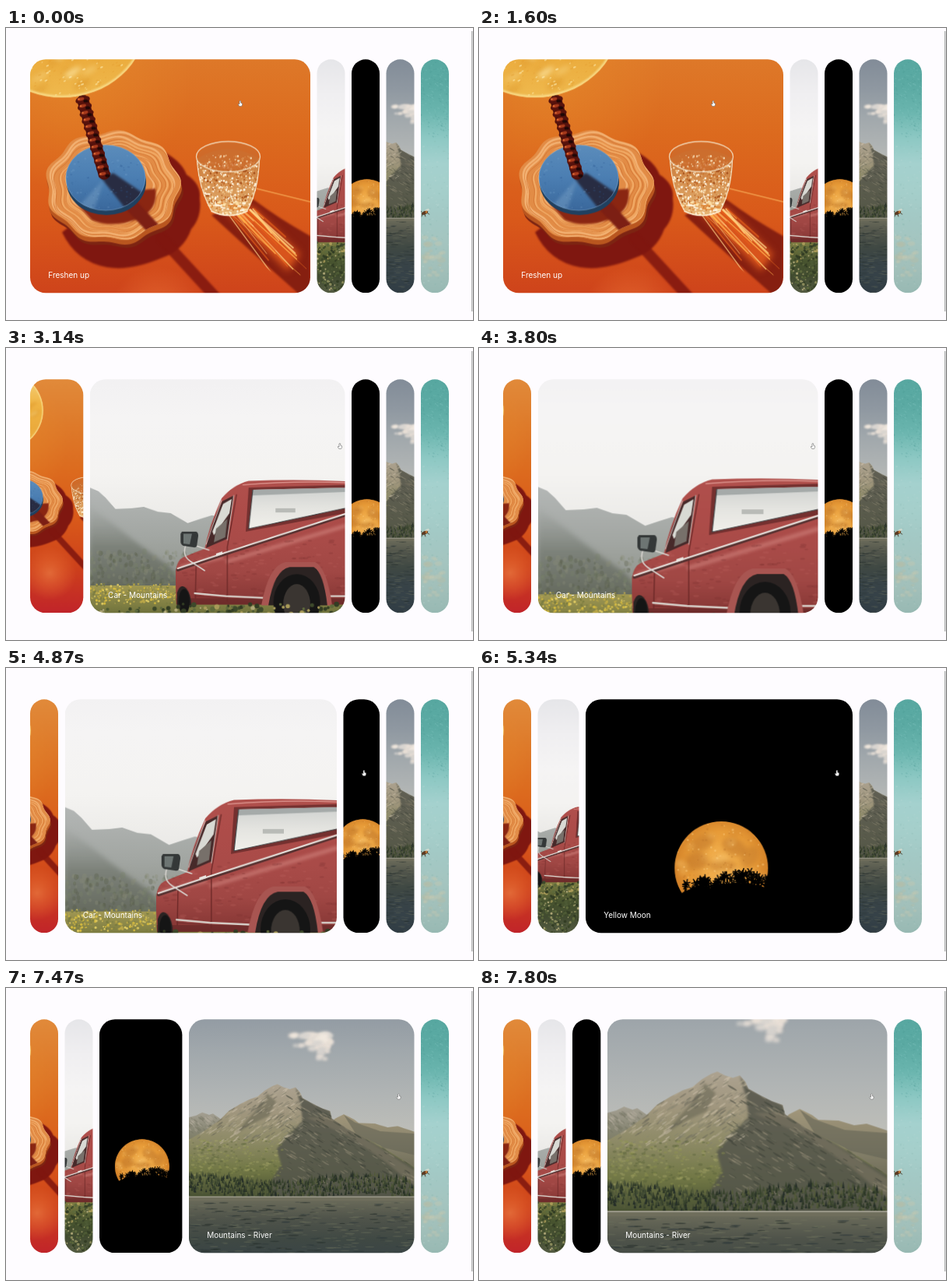
An HTML page with a canvas that plays this animation: 600x375 px, repeating every 8000 ms.

```html
<!DOCTYPE html>
<html lang="en">
<head>
<meta charset="utf-8">
<title>Expanding gallery</title>
<style>
html, body { margin: 0; width: 100%; height: 100%; overflow: hidden; background: #fefcff; }
canvas { display: block; width: 600px; height: 375px; }
</style>
</head>
<body>
<canvas id="stage" width="600" height="375"></canvas>
<script>
const ctx = document.getElementById('stage').getContext('2d');
let g; // context being painted on
let seed = 7;
const rnd = () => {
  seed = (seed + 0x6D2B79F5) | 0;
  let t = Math.imul(seed ^ (seed >>> 15), 1 | seed);
  t = (t + Math.imul(t ^ (t >>> 7), 61 | t)) ^ t;
  return ((t ^ (t >>> 14)) >>> 0) / 4294967296;
};
const pick = list => list[Math.floor(rnd() * list.length)];
const path = d => typeof d === 'string' ? new Path2D(d) : d;

function fill(color, d) { g.fillStyle = color; g.fill(path(d)); }
function line(color, width, d) { g.strokeStyle = color; g.lineWidth = width; g.stroke(path(d)); }
function ellipse(x, y, rx, ry, turn = 0) {
  const p = new Path2D();
  p.ellipse(x, y, rx, ry, turn, 0, 7);
  return p;
}
function oval(color, ...shape) { fill(color, ellipse(...shape)); }
function box(color, x, y, w, h) { g.fillStyle = color; g.fillRect(x, y, w, h); }
function blend(f, colors) {
  colors.forEach((c, i) => f.addColorStop(i / (colors.length - 1), c));
  return f;
}
const fade = (y0, y1, ...colors) => blend(g.createLinearGradient(0, y0, 0, y1), colors);
const glow = (x, y, r, ...colors) => blend(g.createRadialGradient(x, y, 0, x, y, r), colors);
function within(d, paint) { g.save(); g.clip(path(d)); paint(); g.restore(); }
function soft(px, paint) { g.filter = `blur(${px}px)`; paint(); g.filter = 'none'; }
function specks(n, x, y, w, h, colors, rx, ry = rx, turn = 0) {
  while (n--) {
    const k = 0.5 + rnd();
    oval(pick(colors), x + rnd() * w, y + rnd() * h, rx * k, ry * k, turn);
  }
}

// Each photo is a 2:3 portrait, painted at the size it has in an open panel.
function photo(left, paint) {
  const c = document.createElement('canvas');
  c.width = 360;
  c.height = 540;
  g = c.getContext('2d');
  g.lineCap = g.lineJoin = 'round';
  g.translate(-left, 80);
  paint();
  return c;
}

function scallop(x, y, rx, ry) {
  const p = new Path2D();
  for (let a = 0; a < 6.28; a += 0.04) {
    const r = 1 + 0.036 * Math.cos(9 * a + 0.6);
    p.lineTo(x + rx * r * Math.cos(a), y + ry * r * Math.sin(a));
  }
  p.closePath();
  return p;
}

function drinks() {
  box(fade(-80, 460, '#e18a3a', '#de7a2a', '#dc6a1e', '#d9591a', '#cd411b', '#c1242a'), 31, -80, 360, 540);
  box(glow(90, 60, 150, '#e8902c88', '#e8902c00'), 31, -80, 240, 290);
  box(glow(195, 368, 62, '#f58f4e88', '#f07a3a55', '#f07a3a00'), 120, 290, 150, 150);
  // shadows
  soft(1, () => {
    fill('#7f1710', 'M205 160Q226 172 232 188Q251 200 249 219Q252 242 238 258Q228 286 200 295Q160 312 130 307Q90 300 72 262Z');
    line('#7f1710dd', 14, 'M200 270L290 368');
    fill('#861f10', 'M264 240L318 220Q350 244 391 267V341H376Q320 292 264 240Z');
  });
  within('M264 240L320 219L391 262V341H370Z', () => {
    soft(5, () => fill('#d8541c', 'M284 236L316 228L378 290L362 312Z'));
    soft(0.6, () => {
      for (let i = 0; i < 34; i++) {
        const x = 286 + rnd() * 34, k = 0.7 + rnd() * 0.5, len = 12 + rnd() ** 2 * 68;
        line(pick(['#ffb04ecc', '#f0702499', '#ffd488bb', '#e8601caa']), 0.6 + rnd() * 1.5, `M${x} ${240 - (x - 286) / 4}l${len * k} ${len}`);
      }
    });
  });
  soft(0.7, () => line('#f09a4a', 1.4, 'M322 206L391 223'));
  // tray
  fill('#7d2412', scallop(140, 214, 85, 67));
  fill('#b9561f', scallop(138, 209, 85, 68));
  const tray = scallop(137, 202, 85, 69);
  fill('#e28c46', tray);
  within(tray, () => {
    for (let r = 0.97; r > 0.55; r -= 0.07) {
      line(pick(['#f2b071', '#f0a863']), 2.6, scallop(135 + rnd() * 6, 201 + rnd() * 4, 85 * r, 69 * r));
      line('#cf702fbb', 1, scallop(136 + rnd() * 5, 203 + rnd() * 4, 84 * r, 68 * r));
    }
    soft(1.2, () => {
      fill('#8a2612', 'M88 222Q120 250 172 208L192 206Q196 232 172 244Q136 258 110 246Z');
      line('#7c1f14', 17, 'M160 226L215 285');
    });
  });
  // coaster
  oval('#20405f', 129, 198, 51, 42);
  const disc = ellipse(128, 192, 51, 42);
  fill(fade(150, 234, '#5b8cbb', '#4b7eb2', '#3a689c'), disc);
  within(disc, () => {
    soft(1.5, () => fill('#282c42', 'M122 192L138 186L182 216L160 240Z'));
    soft(2, () => fill('#7ba3c877', 'M126 194L92 230L112 236Z'));
    specks(90, 78, 150, 100, 85, ['#7aa5cf44', '#2f5c9244'], 1.2, 0.8);
  });
  line('#7fa8d0aa', 0.8, disc);
  // stem
  line('#4a0f0b', 15, 'M99 93L126 187');
  for (let i = 0; i < 12; i++) {
    const k = i / 11, x = 98.5 + 28 * k, y = 92 + 96 * k;
    oval('#56120c', x, y, 9.5 - 1.5 * k, 5, -0.25);
    oval('#a83a1c', x - 2.5, y - 1, 4.5, 2, -0.25);
    oval('#1f0706', x + 4, y + 1.5, 3, 2);
    oval('#e8743a', x - 5, y - 0.8, 1.3, 0.9);
  }
  // bowl
  const bowl = ellipse(72, -8, 108, 97);
  fill(fade(-80, 90, '#f3cf78', '#f0b444', '#ebab3c', '#efb94e'), bowl);
  within(bowl, () => {
    soft(3, () => specks(60, 31, -80, 150, 172, ['#fff0b888', '#f8d48088', '#dc962a77'], 9, 3, -0.5));
    specks(90, 31, 40, 120, 52, ['#fff0b8aa', '#e09a2c66'], 1.6, 0.7, -0.4);
    soft(1, () => line('#f9dc8c', 3, ellipse(72, -8, 107, 96)));
  });
  // tumbler
  const cup = 'M244.500 168Q247 206 263 234Q286 248 311 234Q325 208 326.500 168Q285 142 244.500 168Z';
  fill(fade(150, 242, '#cf7030', '#cf8444', '#d99a5a', '#e9b878'), cup);
  within(cup, () => {
    specks(620, 246, 172, 80, 70, ['#fff4e0', '#f8dfb4', '#a8521c', '#c8702c', '#efc084', '#fff4e0'], 1);
    specks(60, 258, 222, 52, 18, ['#fff6e0', '#ffe2a8', '#e08a3c'], 2.4, 1);
    line('#f6dcbc', 1.2, 'M245.500 170Q248 206 264 234M325.500 170Q324 208 310 234');
  });
  oval('#cc6c2ccc', 285.5, 165, 39, 18);
  specks(60, 254, 163, 62, 16, ['#f4d8b0', '#d88a4a', '#eec090'], 1);
  line('#eed4b4', 1.3, ellipse(285.5, 165, 41, 19.5));
  line('#fff0d4', 1.6, 'M264 235Q286 246 310 235');
}

function truck() {
  box(fade(-80, 240, '#e6e6e9', '#f0eff1', '#f5f4f4', '#f4f3f1', '#e9e8e5'), 76, -80, 360, 380);
  fill(fade(175, 320, '#b4b7b6', '#a2a6a2', '#8b8f86'), 'M76 178L88 183L98 192L112 208L135 207L152 205L172 212L190 214L214 228L232 222L248 217L300 225V330H76Z');
  soft(3, () => fill(fade(200, 325, '#91969200', '#7c8179', '#62675a'), 'M76 205Q108 228 130 246T190 290L215 325H76Z'));
  specks(200, 76, 268, 150, 50, ['#565d4855', '#79806a55', '#8b8d7855'], 2.2, 3);
  box(fade(312, 460, '#a59b55', '#77783f', '#48542f', '#414b30', '#565d44'), 76, 316, 360, 144);
  specks(260, 76, 314, 150, 28, ['#d6bb3e', '#b9a648', '#7b7c40', '#e0cb62'], 1.2);
  specks(900, 76, 346, 360, 114, ['#333d24', '#5d693c', '#8c8c5c', '#3c4729', '#4d5a35', '#b0a878'], 2.2);
  // body
  const body = 'M197 314V296Q199 280 208 276L238 264Q244 232 262 193Q278 174 300 168.500Q370 166 436 169V343H198Z';
  fill(fade(168, 340, '#b0504c', '#ad4c49', '#a94b48', '#a04744', '#853634'), body);
  within(body, () => {
    soft(2, () => line('#d78d8699', 5, 'M270 282L436 232M205 290L262 276'));
    box('#4b1d1d66', 197, 334, 240, 20);
    specks(160, 200, 250, 236, 80, ['#c46c6633', '#7a2f2f44'], 3, 1.2);
  });
  line('#d98f89', 1.4, 'M292 174Q365 168 436 171');
  // windows
  fill('#74302f', 'M300 178L436 174V214L296 240Z');
  fill(fade(178, 235, '#cfd1cf', '#e4e4e0', '#f0efea'), 'M306 181L436 178V207L300 236Z');
  fill('#a5aaa9', 'M306 181L436 178V184L305 189Z');
  fill('#b9bbb7', 'M338 207h28v6h-28Z');
  line('#3e4446', 1.2, 'M306 181L300 236L436 207');
  fill('#472a2a', 'M263 197L279 189L270 250L240 263Q246 230 263 197Z');
  fill('#d9dad4', 'M264 201L276 194L273 214L251 245L249 240Z');
  fill('#77706a', 'M254 236L270 222L267 248L251 255Z');
  line('#cfc6c0', 1, 'M279 189L270 252M262 196L240 258');
  line('#6b2827', 1.4, 'M283 188L270 262V338M226 284L225 334');
  // chrome strips
  line('#55302f', 4, 'M200 294L266 272L436 217');
  line('#e7e2dd', 2.2, 'M200 292L266 270L436 215');
  line('#d8d2cb', 2.5, 'M224 327L268 331L332 334M413 331L436 331');
  line('#6f2c2c', 1, 'M224 331L332 338');
  fill('#e9e4df', 'M254 271l9 -3v4l-9 3Z');
  // arches and wheels
  fill('#a85551', 'M318 344Q328 288 352 283H394Q410 290 418 344Z');
  fill('#2b2322', 'M328 344Q336 294 358 290H392Q406 298 411 344Z');
  oval('#151515', 368, 340, 33, 40);
  oval('#3a3531', 368, 342, 19, 28);
  fill('#2a2322', 'M199 344V326Q204 312 212 320Q219 328 219 344Z');
  oval('#151515', 209, 339, 8, 18);
  // mirror
  line('#d9d6d1', 1.6, 'M211 260Q206 274 218 282L238 295M226 260L244 266');
  fill('#343838', 'M206 240H226Q229 241 229 246L227 260Q226 263 222 262L208 260Q204 258 204 254V243Z');
  fill('#6d7573', 'M208 243H220L217 258L208 257Z');
  specks(150, 200, 342, 236, 45, ['#3d492b', '#a89a58', '#5f6a3c', '#333d24'], 2.6);
}

function moon() {
  box('#000', 120, -80, 360, 540);
  const disc = ellipse(303, 260, 63, 63);
  fill(glow(303, 255, 66, '#f2b456', '#efaa48', '#e79b38', '#d07e26'), disc);
  within(disc, () => {
    soft(3, () => {
      oval('#c47a2c99', 277, 226, 17, 10, -0.5);
      oval('#c47a2c99', 321, 232, 17, 11, 0.4);
      oval('#c0742899', 270, 250, 15, 12);
      oval('#c47a2c88', 341, 245, 11, 15, 0.5);
      oval('#c47a2c77', 304, 256, 20, 7);
      specks(40, 242, 200, 122, 110, ['#c67c2c55', '#ffd07a66'], 5, 3);
    });
    specks(150, 242, 198, 122, 110, ['#ffd58a66', '#b8702855'], 1.1);
  });
  fill('#000', 'M236 304L252 292L266 286L284 288L300 283L320 280L342 281L356 284L372 290V328H236Z');
  for (let i = 0; i < 78; i++) {
    const x = 252 + rnd() * 112, top = 273 - 12 * Math.exp(-(((x - 328) / 22) ** 2));
    const y = top + rnd() * 20, r = 3.5 + rnd() * 3.5, turn = rnd() * 2;
    let d = `M${x} ${y}L${x + 6 * rnd() - 3} ${y + 14}`;
    for (let k = 0; k < 6; k++) d += `M${x} ${y}l${r * Math.cos(turn + k * 1.05)} ${r * Math.sin(turn + k * 1.05)}`;
    line('#000', 1.5, d);
  }
}

function lake() {
  box(fade(-80, 190, '#828c98', '#8f98a1', '#a1a8ac', '#b0b4b4', '#bfbfb9'), 164, -80, 361, 400);
  soft(2, () => {
    specks(34, 332, 28, 60, 22, ['#e8dfd6', '#d9d5d0', '#f1e9df'], 8, 4, -0.1);
    specks(12, 372, 50, 16, 18, ['#e4dcd4', '#d4d1cd'], 5, 3);
  });
  // far ranges
  fill(fade(150, 215, '#a6a194', '#868572', '#737457'), 'M164 160L176 157L186 152L197 156L203 154L216 163L240 190V240H164Z');
  specks(60, 166, 160, 42, 24, ['#c0b8a855', '#70705f66'], 3.5, 1, 0.7);
  fill(fade(155, 260, '#a1967a', '#85806a', '#646450'), 'M380 180L398 162L412 155L428 163L436 169L462 170L482 176L498 174L525 183V290H380Z');
  fill('#65655699', 'M412 156L430 168L470 182L525 186V220L440 200Z');
  // main peak
  const peak = 'M164 196L190 181L214 164L228 150L246 139L262 131L274 127L286 117L298 110L306 107L316 112L326 115L335 112L342 120L346 129L362 138L376 145L390 150L393 162L420 180L470 205L525 240V292H164Z';
  fill(fade(107, 288, '#aca290', '#a0967e', '#8d8a66', '#727846', '#475032'), peak);
  within(peak, () => {
    soft(1.5, () => {
      fill('#55564bdd', 'M335 112L346 129L390 150L394 162L525 240V292H300L296 262L312 235L305 210L326 186L346 166L344 145Z');
      fill('#80796588', 'M352 160L420 190L480 232L525 270V245L440 190L392 160Z');
      fill('#68675499', 'M290 122L304 135L292 158L262 172L235 190L270 150Z');
    });
    specks(420, 180, 112, 165, 90, ['#cfc4ae77', '#66635677', '#b8ae9466', '#84806e77'], 4, 0.9, -0.6);
    specks(380, 320, 125, 205, 140, ['#98917b66', '#3c413888', '#a59a8255', '#4a4d4277'], 5, 0.9, 0.55);
    specks(330, 164, 195, 150, 60, ['#8f954f66', '#5a633a77', '#a3a36666'], 2, 1.2);
    // forest
    for (let i = 0; i < 900; i++) {
      const x = 164 + rnd() * 361, y = 258 + rnd() * 31 + 6 * Math.sin(x / 40);
      const h = 4 + rnd() * 6;
      fill(pick(['#2c3626', '#37422c', '#434d34', '#262f28', '#535a3a']), `M${x} ${y - h}l1.6 ${h}h-3.200Z`);
    }
  });
  // water
  box(fade(287, 460, '#6e6e5c', '#4f534a', '#3f4843', '#384347', '#364248', '#303c44'), 164, 287, 361, 173);
  box('#aaa698', 164, 286, 361, 1.6);
  box('#6f6e5c', 164, 288, 361, 5);
  specks(700, 164, 295, 361, 165, ['#242d2a99', '#6b705c66', '#7d806655', '#2f393a99'], 6, 0.7);
}

function shore() {
  g.translate(551, 190);
  g.scale(1.8, 1.8);
  g.translate(-551, -190);
  box(fade(40, 340, '#58a8a1', '#5baaa3', '#6ab5ae', '#8cc8c3', '#a4d1ce', '#a5cfcb', '#a3c9c5', '#a4c5c0', '#a2c0ba', '#98b9b3'), 451, 40, 200, 300);
  specks(1500, 451, 40, 200, 100, ['#47979144', '#8accc544'], 1, 0.6, 0.6);
  specks(700, 451, 140, 200, 200, ['#c4dfda44', '#82b4ae44'], 1, 0.7);
  soft(1.5, () => specks(26, 538, 268, 26, 50, ['#c9c7ae66', '#b9bba366'], 4, 2.5));
  // bee
  oval('#d3dbd0', 541, 233.500, 3, 1.2, -0.4);
  oval('#5c3a22', 538, 237, 4.5, 2.2, -0.4);
  oval('#c67a34', 540, 236, 1.3, 1.6);
  line('#3c2b1a', 0.7, 'M535 239l-1 3M538 239l1 3M541 237l3 2M534 236l-2 -2');
}

const panels = [
  ['Freshen up', photo(31, drinks)],
  ['Car - Mountains', photo(76, truck)],
  ['Yellow Moon', photo(120, moon)],
  ['Mountains - River', photo(164.5, lake)],
  ['', photo(371, shore)]
];

// cubic-bezier(.25, .1, .25, 1)
function ease(x) {
  if (x <= 0 || x >= 1) return x <= 0 ? 0 : 1;
  let lo = 0, hi = 1, u;
  for (let i = 0; i < 24; i++) {
    u = (lo + hi) / 2;
    if (0.75 * u * (1 - u) + u ** 3 < x) lo = u; else hi = u;
  }
  return 0.3 * u * (1 - u) ** 2 + 3 * u * u * (1 - u) + u ** 3;
}
const clamp = v => Math.max(0, Math.min(1, v));

const LOOP = 8000, FPS = 15, OPEN = 700, GAP = 8.5, THIN = 36, WIDE = 360;
const switches = [2697, 4832, 7130];
// start, end, x, y of each pointer move
const moves = [[2460, 2600, 429, 126], [4660, 4860, 460, 135], [6870, 7130, 504.5, 139.5]];
const hand = new Path2D('M-1.200 -3.600Q0 -5 .9 -3.600V-1L3 -.2V2L2 4H-1.500L-3.300 1L-2.300 .2L-1.200 1.200Z');

function draw(t) {
  g = ctx;
  box('#fefcff', 0, 0, 600, 375);
  box('#8e918f', 598.3, 4, 1, 360);

  const done = switches.map(s => ease((t - s) / OPEN));
  let x = 31;
  panels.forEach(([label, img], i) => {
    const open = (i ? done[i - 1] ?? 0 : 1) - (done[i] ?? 0);
    const w = THIN + (WIDE - THIN) * open;
    const k = Math.max(1, w / 200) / 1.8;
    const shape = new Path2D();
    shape.roundRect(x, 40.3, w, 300, Math.min(20, w / 2));
    within(shape, () => {
      g.imageSmoothingQuality = 'high';
      g.drawImage(img, x + w / 2 - 180 * k, 190.3 - 270 * k, 360 * k, 540 * k);
      g.globalAlpha = clamp((open - 0.3) * 2);
      g.fillStyle = '#fff';
      g.font = '10px Inter, sans-serif';
      g.fillText(label, x + 23.3, 320.7);
    });
    x += w + GAP;
  });

  let px = 301, py = 97;
  for (const [from, to, tx, ty] of moves) {
    const p = clamp((t - from) / (to - from));
    px += (tx - px) * p;
    py += (ty - py) * p;
  }
  g.save();
  g.translate(px, py);
  g.scale(0.85, 0.85);
  fill('#fff', hand);
  line('#666', 0.7, hand);
  g.restore();
}

function tick(now) {
  const t = now % LOOP;
  draw(Math.floor(t * FPS / 1000 + 0.01) * 1000 / FPS);
  requestAnimationFrame(tick);
}
draw(0);
requestAnimationFrame(tick);
</script>
</body>
</html>
```
